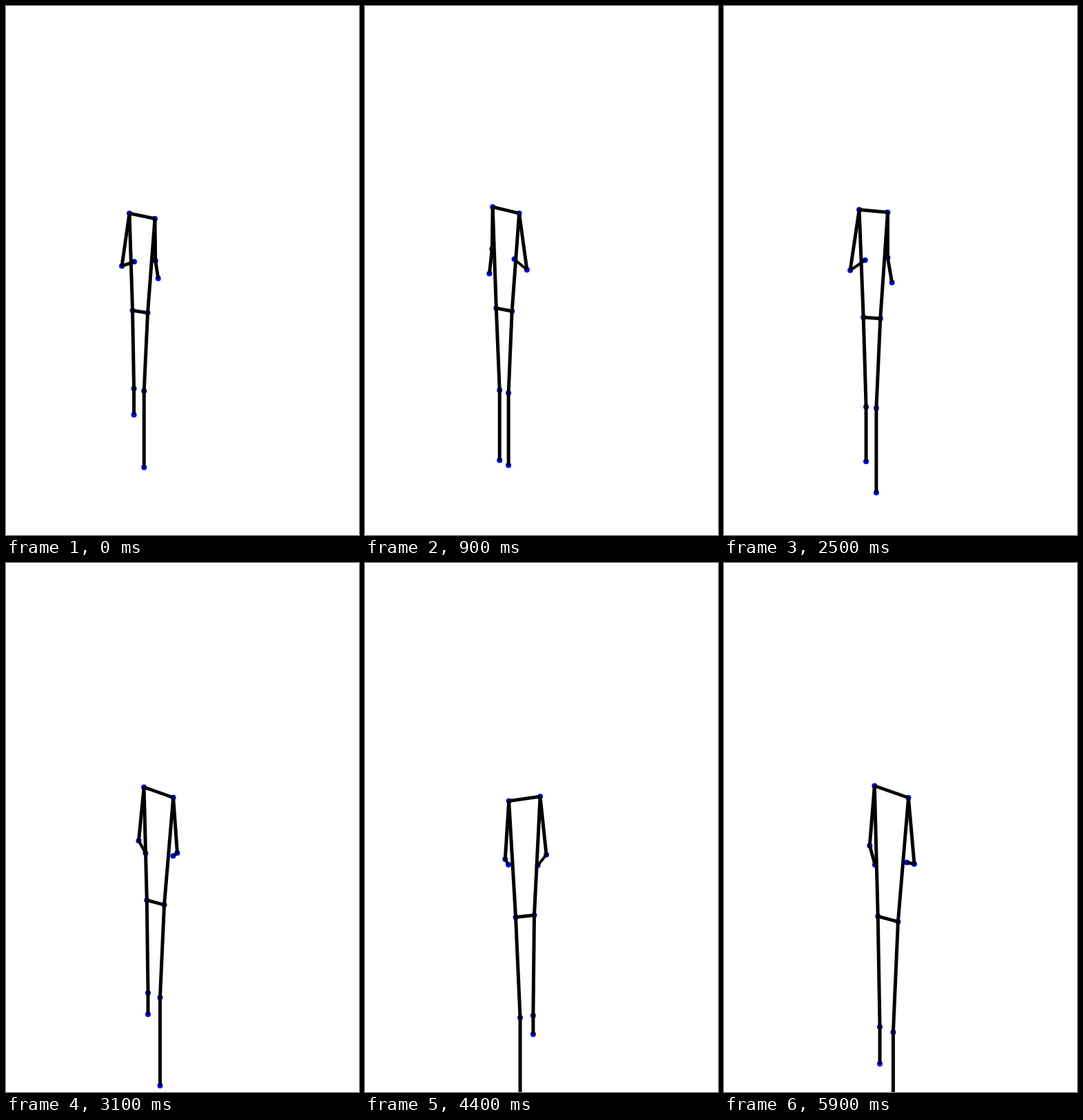
These frames come from a looping animation (512x768 px, 6 s). An HTML page with a canvas:

```html
<!DOCTYPE html>
<html lang="en">
<head>
<meta charset="utf-8">
<title>Running figure</title>
<style>
html, body { margin: 0; width: 100%; height: 100%; overflow: hidden; background: #fff; }
canvas { display: block; }
</style>
</head>
<body>
<canvas id="stage" width="512" height="768"></canvas>
<script>
const ctx = document.getElementById('stage').getContext('2d');
const STEP = 100, COUNT = 60, STRIDE = 27;

// Cosine of a phase in turns, highest at the given peak
const wave = (phase, peak) => Math.cos(2 * Math.PI * (phase - peak));

// One arm and leg; side is -1 for left, 1 for right, and the two run half a stride apart
function limbs(step, side, size, cx, cy) {
  const stride = step / STRIDE;
  const phase = stride + (side > 0 ? 0.5 : 0);
  const tilt = 0.013 + 0.034 * wave(stride, 0.18);
  const lean = -0.012 - 0.016 * wave(stride, 0.15);
  const lift = ((1 + wave(phase, 0.09)) / 2) ** 3;
  const move = ([x, y], out, down) => [x + side * out * size, y + down * size];

  const shoulder = move([cx, cy], 0.133, side * tilt);
  const elbow = move(shoulder, 0.042 + 0.042 * wave(phase, 0.92), 0.495 + 0.075 * wave(phase, 0.88));
  const wrist = move(elbow, -0.05 - 0.09 * wave(phase, 0.92), 0.07 - 0.18 * wave(phase, 0.86));
  const hip = move([cx + lean * size, cy], 0.079, 1 + side * tilt * 0.45);
  const knee = move(hip, -0.038 + 0.03 * lift, 0.815 + 0.0009 * step);
  const ankle = move(knee, 0, 0.8 - 0.67 * lift);
  return { shoulder, elbow, wrist, hip, knee, ankle };
}

function dot([x, y]) {
  ctx.beginPath();
  ctx.arc(x, y, 4, 0, 2 * Math.PI);
  ctx.fill();
}

// Bones are 5 px thick along the axis they cross, so diagonals look thinner
function bone([x1, y1], [x2, y2]) {
  const steep = Math.abs(y2 - y1) > Math.abs(x2 - x1);
  const dx = steep ? 2.5 : 0, dy = steep ? 0 : 2.5;
  ctx.beginPath();
  ctx.moveTo(x1 - dx, y1 - dy);
  ctx.lineTo(x1 + dx, y1 + dy);
  ctx.lineTo(x2 + dx, y2 + dy);
  ctx.lineTo(x2 - dx, y2 - dy);
  ctx.fill();
}

function draw(step) {
  const stride = step / STRIDE;
  const size = 139 / (1 - 0.0042 * step);
  const cx = 197.5 + 0.77 * step;
  const cy = 316 + 24 * wave(2 * stride, 0.34) + 9 * wave(stride, 0.78);
  const left = limbs(step, -1, size, cx, cy);
  const right = limbs(step, 1, size, cx, cy);
  const sides = [left, right];

  ctx.fillStyle = '#fff';
  ctx.fillRect(0, 0, 512, 768);
  ctx.fillStyle = '#00f';
  sides.forEach(body => Object.values(body).forEach(dot));
  ctx.fillStyle = '#000';
  for (const { shoulder, elbow, wrist, hip, knee, ankle } of sides) {
    bone(shoulder, elbow);
    bone(elbow, wrist);
    bone(shoulder, hip);
    bone(hip, knee);
    bone(knee, ankle);
  }
  bone(left.shoulder, right.shoulder);
  bone(left.hip, right.hip);
}

const start = performance.now();
function tick() {
  draw(Math.floor((performance.now() - start) / STEP) % COUNT);
  requestAnimationFrame(tick);
}
tick();
</script>
</body>
</html>
```
